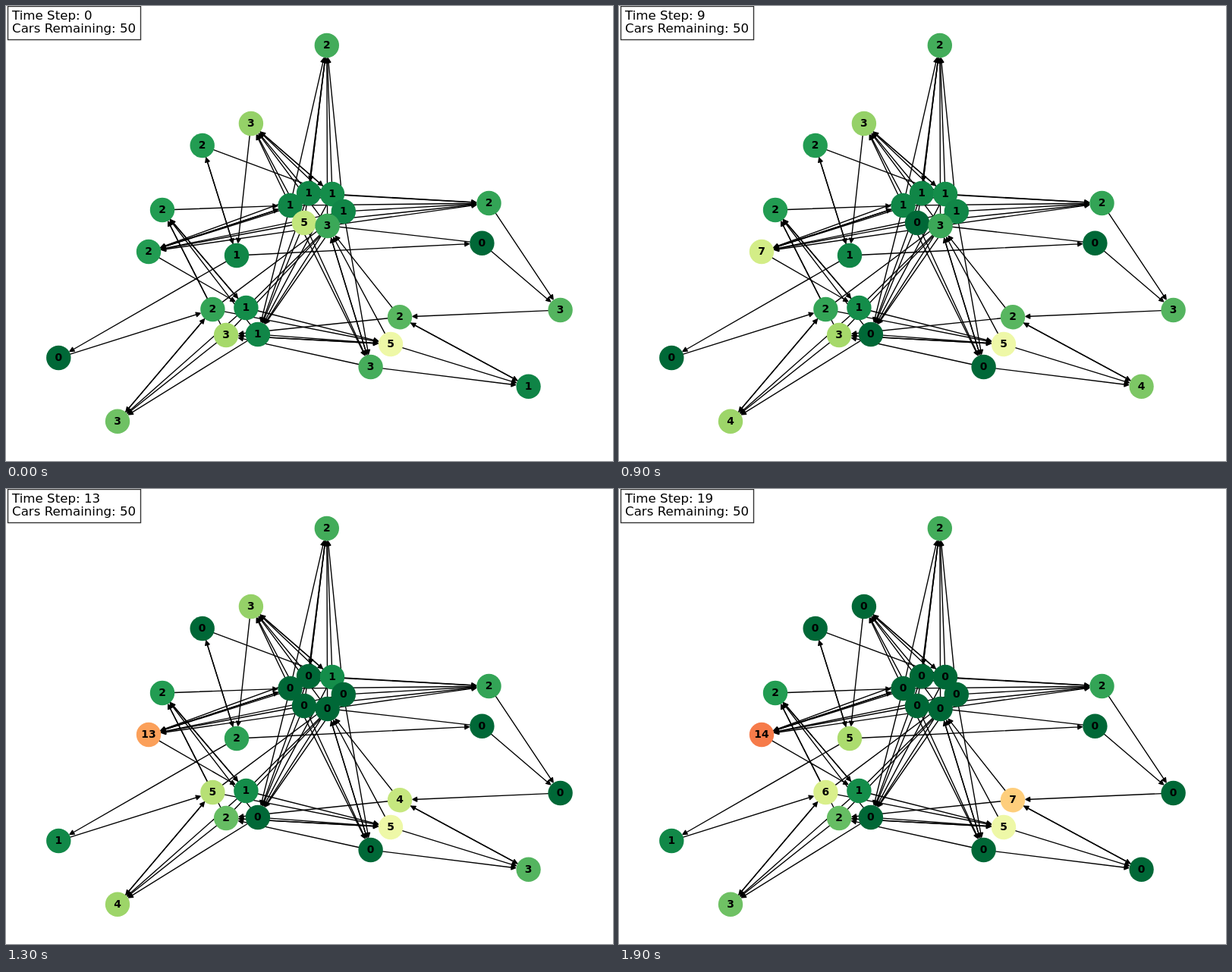
Recreate the animation shown at these times as an HTML page. Size 800 by 600 pixels, loop 2 s.

```html
<!DOCTYPE html>
<html lang="en">
<head>
<meta charset="utf-8">
<title>Traffic network</title>
<style>
  html, body { margin: 0; width: 100%; height: 100%; overflow: hidden; background: #fff; }
  svg { display: block; width: 800px; height: 600px; font-family: "DejaVu Sans", sans-serif; }
  .edges { stroke: #000; stroke-width: 1.39; stroke-linejoin: round; }
  .nodes text { font-size: 13.89px; font-weight: bold; text-anchor: middle; }
  .info { font-size: 16.67px; }
</style>
</head>
<body>
<svg viewBox="0 0 800 600">
  <g class="edges"></g>
  <g class="nodes"></g>
  <g class="info">
    <rect x="2.5" y="0.5" width="175" height="44" fill="#fff" stroke="#333" stroke-width="1.39"/>
    <text x="8" y="18" id="step"></text>
    <text x="8" y="35">Cars Remaining: 50</text>
  </g>
</svg>
<script>
const STEP_MS = 100, STEPS = 20, RADIUS = 16.2;

// name: [x, y, initial cars, capacity]
const nodes = {
  A: [422.8, 52, 2, 13], B: [322.9, 155, 3, 11], C: [258.7, 184, 2, 18],
  D: [206, 269, 2, 18], E: [188, 324, 2, 18], F: [304, 329, 1, 16],
  G: [374.5, 263, 1, 16], H: [399, 247, 1, 16], I: [430, 248, 1, 13],
  J: [444.8, 271, 1, 16], K: [393, 286, 5, 14], L: [423.6, 290, 3, 21],
  M: [636.5, 260, 2, 15], N: [627.4, 312.8, 0, 15], O: [730.6, 401, 3, 17],
  P: [519, 410.2, 2, 11], Q: [507, 446, 5, 11], R: [480.6, 476, 3, 19],
  S: [688.6, 501.8, 1, 17], T: [272.4, 400, 2, 15], U: [316.4, 398, 1, 13],
  V: [290.1, 434, 3, 10], W: [331.9, 433, 1, 16], X: [69.3, 464, 0, 15],
  Y: [147, 547.8, 3, 14]
};

// origin followed by its destinations
const roads = "AH BIF CFI DUG EGU FCNX GABEMRW HABEMW IABEMW JABEMRW KABEMRW " +
  "LABEMRW MO NKO OP PLSV QLSV RLSV SP TDJQY UJDQY VDJQY WDQY XT YT";

// step, origin, destination, cars
const moves = ("4KE5 8RS1 9RS2 9WY1 10OP3 10SP1 10VT3 11LE3 11HE1 11JE1 " +
  "11CF2 11FX1 12GE1 13PV2 15IE1 18SP1 19SP2 19BF3 19YT1")
  .split(" ").map(m => m.match(/(\d+)(\w)(\w)(\d)/).slice(1))
  .map(([step, from, to, cars]) => ({ step: +step, from, to, cars: +cars }));

const palette = ["006837", "1a9850", "66bd63", "a6d96a", "d9ef8b", "ffffbf",
  "fee08b", "fdae61", "f46d43", "d73027", "a50026"]
  .map(hex => [0, 2, 4].map(i => parseInt(hex.substr(i, 2), 16)));

function loadColor(load) {
  const pos = Math.min(load, 0.999) * 10, i = Math.floor(pos);
  const mix = palette[i].map((c, k) => Math.round(c + (palette[i + 1][k] - c) * (pos - i)));
  return `rgb(${mix})`;
}

function add(parent, tag, attrs) {
  const el = document.createElementNS("http://www.w3.org/2000/svg", tag);
  for (const key in attrs) el.setAttribute(key, attrs[key]);
  return parent.appendChild(el);
}

function drawRoad(parent, from, to) {
  const [x1, y1] = nodes[from], [x2, y2] = nodes[to];
  const length = Math.hypot(x2 - x1, y2 - y1);
  const ux = (x2 - x1) / length, uy = (y2 - y1) / length;
  const point = (back, side) =>
    `${(x2 - ux * back - uy * side).toFixed(2)} ${(y2 - uy * back + ux * side).toFixed(2)}`;
  const tip = RADIUS + 0.85, base = tip + 5.56;
  add(parent, "path", {
    d: `M${point(length - RADIUS + 1, 0)}L${point(tip, 0)}` +
       `M${point(tip, 0)}L${point(base, 2.78)}L${point(base, -2.78)}Z`
  });
}

const edgeLayer = document.querySelector(".edges");
for (const [from, ...targets] of roads.split(" "))
  for (const to of targets) drawRoad(edgeLayer, from, to);

const nodeLayer = document.querySelector(".nodes");
const views = {};
for (const name in nodes) {
  const [cx, cy] = nodes[name];
  views[name] = { disc: add(nodeLayer, "circle", { cx, cy, r: RADIUS }) };
}
for (const name in nodes) {
  const [x, y] = nodes[name];
  views[name].label = add(nodeLayer, "text", { x, y: Math.round(y + 4) });
}

const stepLabel = document.getElementById("step");

function render(step) {
  const cars = {};
  for (const name in nodes) cars[name] = nodes[name][2];
  for (const move of moves) {
    if (move.step > step) continue;
    cars[move.from] -= move.cars;
    cars[move.to] += move.cars;
  }
  for (const name in nodes) {
    views[name].disc.setAttribute("fill", loadColor(cars[name] / nodes[name][3]));
    views[name].label.textContent = cars[name];
  }
  stepLabel.textContent = `Time Step: ${step}`;
}

const start = performance.now();
let shown = -1;
function tick() {
  const step = Math.floor((performance.now() - start) / STEP_MS) % STEPS;
  if (step !== shown) render(shown = step);
  requestAnimationFrame(tick);
}
tick();
</script>
</body>
</html>
```
